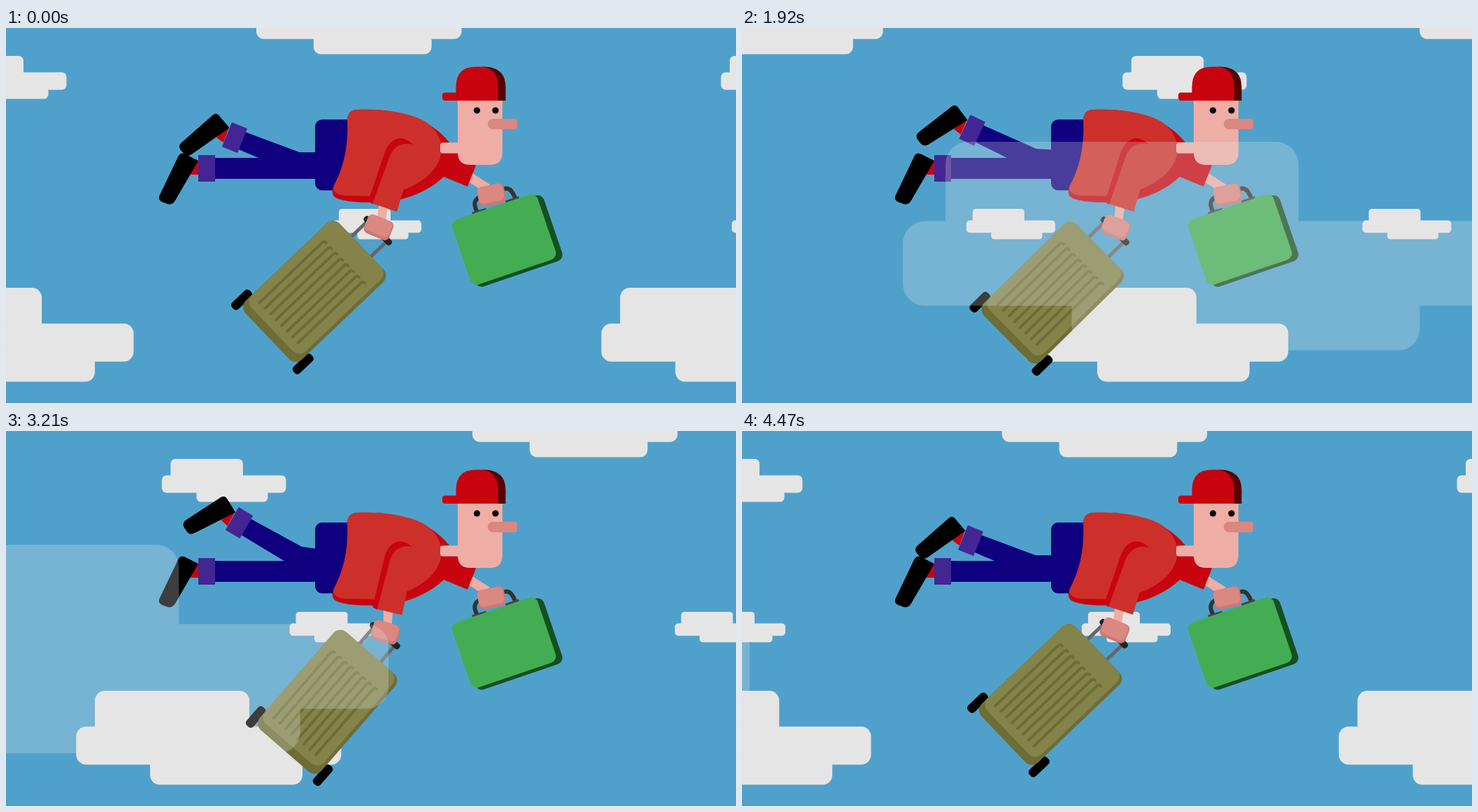
An HTML page for the animation above (4530 ms loop, 1044 by 537 pixels).

```html
<!DOCTYPE html>
<html lang="en">
<head>
<meta charset="utf-8">
<title>Flying traveller</title>
<style>
  html, body { margin: 0; width: 100%; height: 100%; overflow: hidden; background: #4fa1cb; }
  svg { display: block; width: 100%; height: 100%; }
  .navy { fill: #100080; } .cuff { fill: #432693; }
  .red { fill: #cd302a; } .deep { fill: #c8040f; }
  .skin { fill: #eeada5; } .pink { fill: #da8880; } .shade { fill: #cd7771; }
</style>
</head>
<body>
<svg viewBox="0 0 1044 537" preserveAspectRatio="none">
  <defs>
    <!-- every cloud is this shape, scaled -->
    <g id="cloud">
      <rect x="70.500" width="583" height="180" rx="37"/>
      <rect y="132" width="1000" height="141" rx="37"/>
      <rect x="279" y="230" width="575" height="117" rx="36"/>
    </g>
    <g id="hand">
      <rect class="shade" x="-19.500" y="-14.250" width="39" height="28.500" rx="7"/>
      <rect class="pink" x="-19.500" y="-14.250" width="37" height="24.500" rx="7"/>
    </g>
  </defs>
  <g id="sky" fill="#e5e5e5"></g>

  <!-- far arm and green case -->
  <path class="skin" d="M667 208L692 224L686 236L661 220Z"/>
  <path d="M674 264Q665 247 678 242L714 230Q723 228 729 246" fill="none" stroke="#333" stroke-width="6"/>
  <path d="M667 266.500L687 260.500M715 250L734 243.500" stroke="#444" stroke-width="6"/>
  <g transform="translate(713.500 303) rotate(-18.800)">
    <rect x="-60" y="-45.700" width="131.400" height="99.400" rx="10" fill="#14501f"/>
    <rect x="-65.700" y="-49.700" width="129" height="98.400" rx="10" fill="#44ad53"/>
  </g>
  <use href="#hand" transform="translate(694.500 239) rotate(-12)"/>

  <!-- legs -->
  <g id="leg">
    <path class="deep" d="M319 142L311 164L301 157L311 145Z"/>
    <path d="M296 124.500Q300 121 304 124.500L319.500 143L266 180.500Q260 185 255 180.500L250 175Q246 170 250 165Z"/>
    <path class="navy" d="M341 148.500L420 178H510V211H420L333 174Z"/>
    <path class="cuff" d="M323 135L345 144L331 179L309 170Z"/>
  </g>
  <path class="deep" d="M270 191H277V210H262Z"/>
  <path d="M247 182.500Q250 178 255 180L275 190L242 247Q238 254 231 252L223 249Q217 246 219.500 240Z"/>
  <rect class="navy" x="297" y="186" width="150" height="30"/>
  <rect class="cuff" x="275" y="182" width="24" height="38"/>
  <rect class="navy" x="442" y="131" width="70" height="101.500" rx="10"/>

  <!-- shirt -->
  <path class="deep" d="M488 131Q489 117 503 117C550 115 604 125 634 164L672 197L660 227L626 213C600 238 560 250 528 250C510 250 490 249 480 246C466 243 464 236 470 223C486 195 490 160 488 131Z"/>
  <path class="red" d="M488 131Q489 117 503 117C545 115 580 123 598 133C614 143 623 158 623 174C621 213 573 236 530 241L485 240Q468 239 468 228C486 195 490 160 488 131Z"/>

  <!-- head -->
  <rect class="skin" x="621" y="164" width="40" height="15.500" rx="4"/>
  <path class="skin" d="M646 100H710V178Q710 196 692 196H664Q646 196 646 178Z"/>
  <circle cx="673.500" cy="118" r="4.600"/>
  <circle cx="700" cy="118" r="4.600"/>
  <path class="pink" d="M696 130H728Q731 130 731 133V142Q731 145 728 145H696Q689 144 689 137.500T696 130Z"/>
  <path fill="#560000" d="M682 55.500H686Q714.500 57 714.500 85V104H690Z"/>
  <path class="deep" d="M643.500 104V84Q644 55.500 672 55.500H683Q704 60 704 85V104Z"/>
  <rect class="deep" x="624" y="92.500" width="30" height="11.500" rx="4"/>

  <!-- near arm and suitcase -->
  <g id="arm">
    <g transform="translate(441 377) rotate(46.300)">
      <path d="M-20-86V-126M20-86V-126" stroke="#666" stroke-width="5"/>
      <rect x="-27" y="-130" width="54" height="9" rx="4" fill="#222"/>
      <rect x="-69.500" y="66" width="13" height="35" rx="5"/>
      <rect x="57.500" y="66" width="13" height="35" rx="5"/>
      <rect x="-58" y="-93" width="116.500" height="186" rx="13" fill="#6e6d36"/>
      <rect x="-58" y="-93" width="111.500" height="174.500" rx="13" fill="#84834a"/>
      <path id="ribs" fill="none" stroke="#6e6d36" stroke-width="4" stroke-linecap="round"/>
    </g>
    <path class="skin" d="M533 253L546 257L543 276H531Z"/>
    <use href="#hand" transform="translate(533 285.500) rotate(22)"/>
    <path class="red" d="M523 251L559 263L569 230L590 182L552 170Z"/>
    <path class="deep" d="M518 248L541 180C547 160 565 149 582 167C567 163 556 168 549 183L524 252Z"/>
  </g>

  <g id="haze" fill="#e5e5e5" opacity=".27"></g>
</svg>
<script>
const $ = id => document.getElementById(id);
const LOOP = 4530, STEP = 30, LAST = LOOP - 2 * STEP;

// A row of equal clouds, drifting left at a steady speed (px per ms)
function cloudRow(layer, x, y, w, h, gap, speed) {
  const copies = [0, 1, 2].map(i =>
    `<use href="#cloud" transform="translate(${x + i * gap} ${y}) scale(${w / 1000} ${h / 347})"/>`);
  const row = document.createElementNS("http://www.w3.org/2000/svg", "g");
  row.innerHTML = copies.join("");
  $(layer).append(row);
  return t => row.setAttribute("transform", `translate(${-speed * t} 0)`);
}

// A limb turning about a joint, easing between [time, degrees] extremes
function limb(id, joint, keys) {
  return t => {
    const i = Math.max(1, keys.findIndex(k => k[0] >= t));
    const [t0, a] = keys[i - 1], [t1, b] = keys[i];
    const ease = (1 - Math.cos(Math.PI * (t - t0) / (t1 - t0))) / 2;
    $(id).setAttribute("transform", `rotate(${a + (b - a) * ease} ${joint})`);
  };
}

const parts = [
  cloudRow("sky", 358, -64.5, 293.5, 102, 1061, .2343),
  cloudRow("sky", -91, 40, 177.5, 61.5, 1113.5, .2491),
  cloudRow("sky", 467, 259, 127, 43.5, 1137.5, .3735),
  cloudRow("sky", 1038, 259, 127, 43.5, 1117.5, .3735),
  cloudRow("sky", -196.5, 372, 379, 134.5, 1048, .234),
  cloudRow("haze", 1046.5, 163, 866, 298.5, 3000, .4253),
  limb("arm", "567 182", [[0, 0], [700, 11.4], [2930, -10], [3730, 7.2], [LAST, 0]]),
  limb("leg", "508 190", [[0, 0], [700, 3.2], [1320, -.3], [2650, 8.3], [3500, 8.2], [LAST, 0]])
];

let ribs = "";
for (let i = 0; i < 8; i++) ribs += `M${-42.5 + i * 11.4} 68V-56q0-4 4-4`;
$("ribs").setAttribute("d", ribs);

const begin = performance.now();
function tick() {
  const now = (performance.now() - begin) % LOOP;
  const t = Math.min(Math.floor(now / STEP) * STEP, LAST);
  parts.forEach(move => move(t));
  requestAnimationFrame(tick);
}
tick();
</script>
</body>
</html>
```
